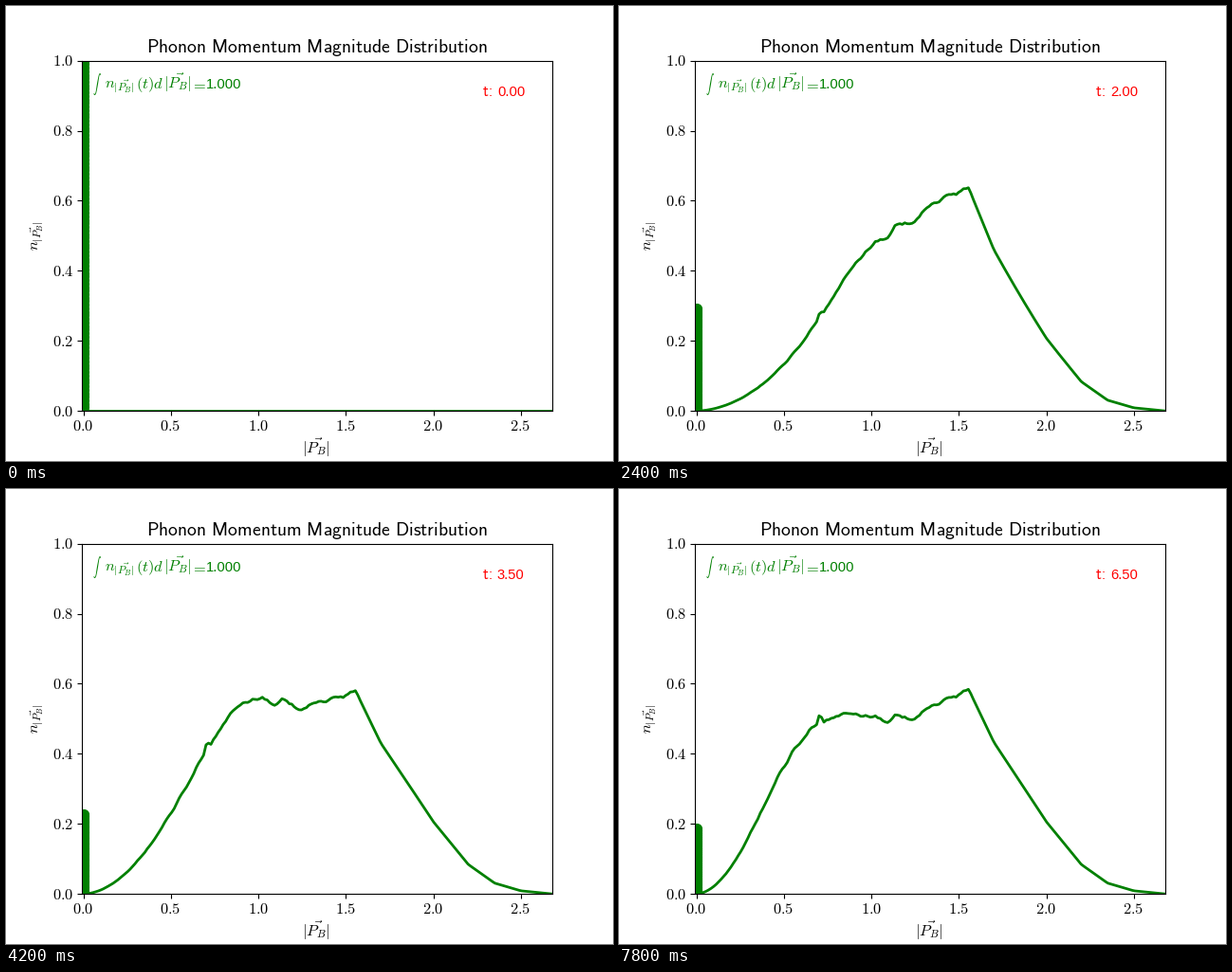
A matplotlib script that plays this animation: 640 px wide and 480 px high, repeating every 8 s.

```python
import matplotlib.pyplot as plt
import numpy as np
from matplotlib.animation import FuncAnimation

W, H, DPI = 640, 480, 100
INTERVAL, FRAMES, HOLD = 100, 80, 3   # the picture changes every HOLD frames
DT = 0.25
SIZE = 11.8
GREEN = "green"
X_MIN, X_MAX = -0.01, 2.68

plt.rcParams["mathtext.fontset"] = "cm"

# Long-time level: a broad plateau up to the grid edge, then a falling corner tail
LEVEL_K = [0, 0.5, 0.9, 1.25, 1.557, 1.7, 2.0, 2.2, 2.35, 2.5, 2.68]
LEVEL_N = [0.27, 0.38, 0.50, 0.51, 0.582, 0.433, 0.206, 0.084, 0.031, 0.009, 0]

DK = 0.014
momentum = np.arange(0, X_MAX + DK, DK)
noise = np.random.default_rng(4).normal(0, 0.016, momentum.size + 2)
ripple = 1 + np.convolve(noise, [0.3, 0.4, 0.3], "valid")
ripple += 0.06 * np.exp(-((momentum - 0.705) / 0.013) ** 2)
ripple[momentum > 1.57] = 1
level = np.interp(momentum, LEVEL_K, LEVEL_N) * ripple


def distribution(t):
    """Each mode rises to its level as a damped oscillation, faster at high momentum."""
    phase = t ** 2 / (t + 0.15) * momentum ** 1.7
    return level * (1 - np.exp(-0.6 * phase) * np.cos(0.73 * phase))


fig = plt.figure(figsize=(W / DPI, H / DPI), dpi=DPI, facecolor="white")
ax = fig.add_subplot()
ax.set_xlim(X_MIN, X_MAX)
ax.set_ylim(0, 1)
ax.set_xticks(np.arange(0, 2.6, 0.5), labels=[])
ax.set_yticks(np.linspace(0, 1, 6), labels=[])
ax.set_title(r"$\mathsf{Phonon\ Momentum\ Magnitude\ Distribution}$", fontsize=14.2)


def put(x, y, text, color="black", size=SIZE, **style):
    style = {"ha": "left", "va": "baseline", **style}
    return fig.text(x / W, 1 - y / H, text, color=color, fontsize=size, **style)


def put_math(x, y, tex, *args, **style):
    return put(x, y, f"${tex}$", *args, **style)


def put_number(x, y, text, color):
    return put(x, y, text, color, 10.6, family="Liberation Sans")


for v in ax.get_xticks():
    x = 80 + 496 * (v - X_MIN) / (X_MAX - X_MIN)
    put_math(x - 0.5, 447.5, f"{v:.1f}", ha="center")
for v in ax.get_yticks():
    put_math(71, 432.6 - 369.6 * v, f"{v:.1f}", ha="right")

VECTOR = r"|\vec{P_B}|"
DENSITY = "n_{" + VECTOR + "}"

put_math(327, 472, VECTOR, ha="center")
put_math(34.5, 258.5, DENSITY, rotation=90, rotation_mode="anchor")

put_math(91, 83, r"\int", GREEN, 6.1, va="center")
put_math(104.5, 87.2, DENSITY, GREEN)
put_math(137, 87.2, "(t)d", GREEN)
put_math(165.5, 87.2, VECTOR, GREEN)
put_math(203, 87.2, "=", GREEN, ha="center")
put_number(210.5, 87.2, "1.000", GREEN)

put_math(501.6, 94.6, r"\mathsf{t}", "red")
put_number(508.3, 94.6, ":", "red")
clock = put_number(518, 94.6, "0.00", "red")

curve, = ax.plot(momentum, 0 * momentum, color=GREEN, lw=2)
peak, = ax.plot([], [], "o", color=GREEN, ms=7)


def update(frame):
    t = frame // HOLD * DT
    density = distribution(t)
    zero_peak = 1 - density.sum() * DK   # the total stays at one
    curve.set_ydata(density)
    peak.set_data(np.zeros(100), np.linspace(0, zero_peak, 100))
    clock.set_text(f"{t:.2f}")
    return curve, peak, clock


update(0)
anim = FuncAnimation(fig, update, frames=FRAMES, interval=INTERVAL,
                     init_func=lambda: update(0), repeat=True, repeat_delay=0)
plt.show()
```
